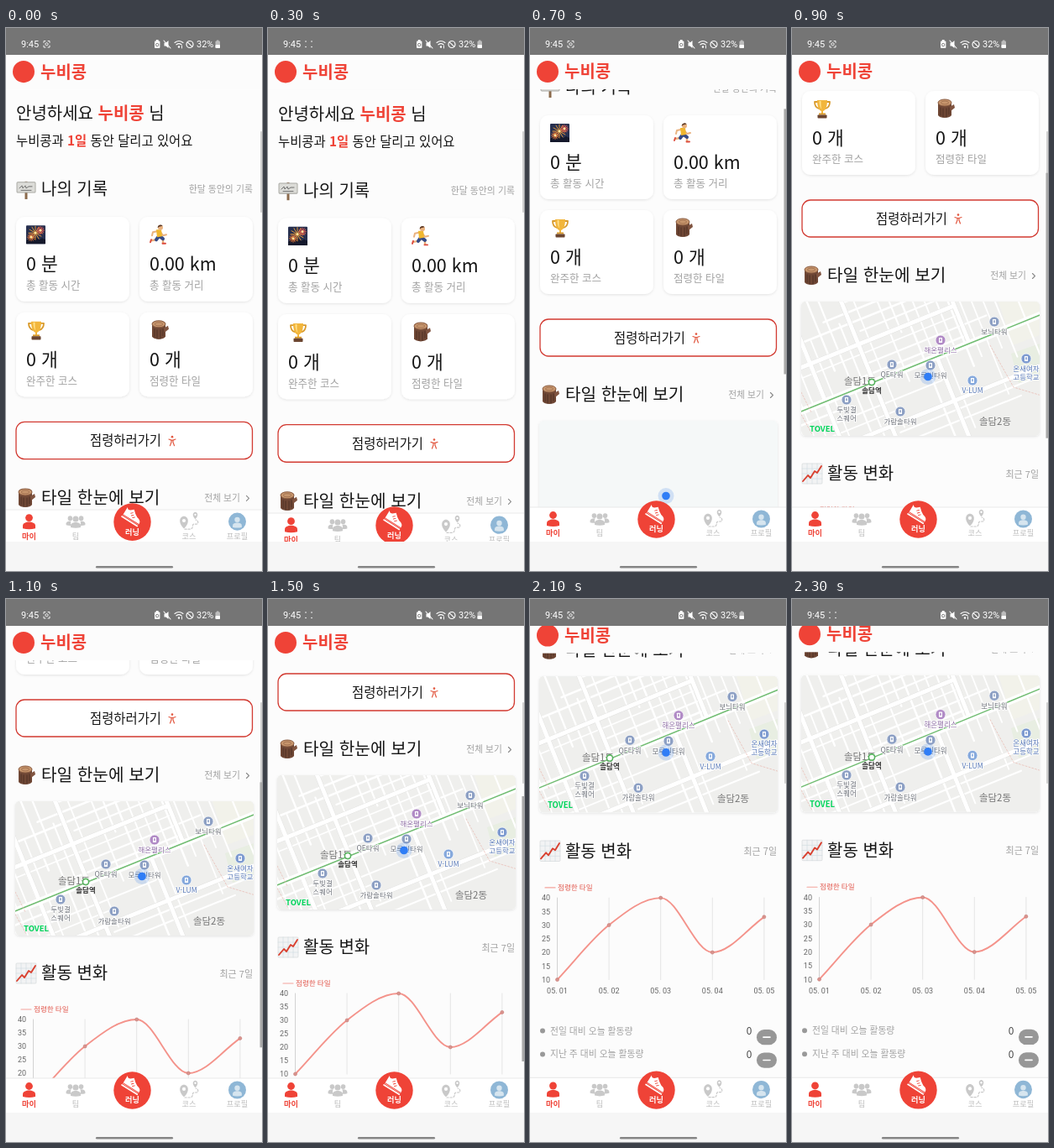
Animation, 305 px wide and 647 px high, one loop 2400 ms. Source, as an HTML page:

```html
<!DOCTYPE html>
<html lang="ko">
<head>
<meta charset="utf-8">
<style>
html, body { margin: 0; width: 100%; height: 100%; overflow: hidden; background: #f6f6f6; }
svg { display: block; width: 305px; height: 647px; }
text { font-family: "Noto Sans CJK KR", "Noto Sans CJK", "Noto Sans", sans-serif; white-space: pre; }
.ui text { font-family: Roboto, "Noto Sans", sans-serif; }
</style>
</head>
<body>
<svg id="stage" viewBox="0 0 305 647"></svg>
<script>
const RED = '#ef4337', GRAY = '#a2a2a2', INK = '#161616', PAPER = '#fcfcfc';
const $ = id => document.getElementById(id);

// Shape helpers; text is placed by its vertical middle.
const text = (x, y, size, str, fill = INK, extra = '') =>
  `<text x="${x}" y="${y + size * .37}" font-size="${size}" fill="${fill}" ${extra}>${str}</text>`;
const rect = (x, y, w, h, fill, r = 0, extra = '') =>
  `<rect x="${x}" y="${y}" width="${w}" height="${h}" rx="${r}" fill="${fill}" ${extra}/>`;
const dot = (x, y, r, fill, extra = '') => `<circle cx="${x}" cy="${y}" r="${r}" fill="${fill}" ${extra}/>`;
const path = (d, fill) => `<path d="${d}" fill="${fill}"/>`;
const line = (d, color, w = 1, extra = '') =>
  `<path d="${d}" fill="none" stroke="${color}" stroke-width="${w}" stroke-linecap="round" stroke-linejoin="round" ${extra}/>`;
const at = (x, y, body, more = '') => `<g transform="translate(${x} ${y}) ${more}">${body}</g>`;
const MID = 'text-anchor="middle"', END = 'text-anchor="end"', MED = 'font-weight="500"', BOLD = 'font-weight="700"';

let seed = 11;
const random = () => (seed = seed * 16807 % 2147483647) / 2147483647;

// Pictograms on a 24 px square
const sign = rect(10.5, 3, 3, 21, '#8b6a4c') + rect(1, 4, 22, 12, '#dcdcd8', 1, 'stroke="#a9a9a4"') +
  line('M4 11l3-3 1 3 3-3 1 3 3-2 4 0M6 13.5h12', '#555', .8);

function fireworks() {
  let s = rect(0, 1, 23, 22, '#27304f', 1) + path('M0 19l4-3 3 2 4-3 5 3 3-2 4 2v5H0z', '#15192c');
  [[11, 10, 8, '#f2a13a'], [17, 7, 4.5, '#ee5d50'], [6, 15, 4.5, '#ef7b3a']].forEach(([x, y, r, c]) => {
    for (let i = 0; i < 12; i++) {
      const a = i * Math.PI / 6, u = Math.cos(a), v = Math.sin(a);
      s += line(`M${x + u * 1.5} ${y + v * 1.5}L${x + u * r} ${y + v * r}`, c, .9);
    }
    s += dot(x, y, 1.4, '#ffe9a0');
  });
  return s;
}

const runner = line('M11 15l-3 3-6 1', '#e9b27f', 2.4) + line('M12 15l4 3 0 4', '#e9b27f', 2.4) +
  line('M9 8l-5 1-1 4M13 9l3 4 4-1', '#e9b27f', 2) + line('M11 14l-3 4M12 14l4 3', '#364b86', 4) +
  path('M8 6h6l1 8-6 1z', '#f0b72f') + dot(13, 3.6, 3, '#e9b27f') + path('M9.6 4a3.4 3.4 0 0 1 6-2.4l-4 1z', '#5b3825') +
  line('M2 18l-1 3M15.5 22.5h3.5', '#dc4a3c', 1.9);

const trophy = line('M7 4H3c0 5 2 7 5 8M17 4h4c0 5-2 7-5 8', '#d99a2b', 1.8) +
  path('M6 2h12c0 8-2 12-5 13v3h-2v-3C8 14 6 10 6 2z', '#f2b63c') + path('M8.5 3h2c0 5 0 7 1 10-2-2-3-5-3-10z', '#ffe08a') +
  rect(8, 17.5, 8, 2, '#d99a2b') + rect(6.5, 19.5, 11, 4, '#6b4530', .7);

const log = path('M3 5v15c2 4 14 4 16 0V5z', '#6f4735') + path('M17 10l5-3 1 4-5 4z', '#805440') +
  line('M6 11v9M9 12v10M13 12v10M16 11v8', '#4e3025', 1) + `<ellipse cx="11" cy="5" rx="8" ry="4" fill="#c7966d" stroke="#8a5c42"/>` +
  `<ellipse cx="11" cy="5" rx="4.5" ry="2" fill="none" stroke="#9b6a4b" stroke-width=".8"/>`;

const trend = rect(0, 0, 24, 24, '#f2f3f4', 1, 'stroke="#d4d8da" stroke-width=".7"') +
  line('M0 6h24M0 12h24M0 18h24M6 0v24M12 0v24M18 0v24', '#cfdbe0', .6) +
  line('M1 21l6-7 3 3 5-8 3 2 5-8', '#d9402f', 1.9);

function card(x, y, icon, value, label) {
  return rect(x, y, 135, 100, '#fff', 10, 'filter="url(#soft)"') + at(x + 12, y + 9, icon) +
    text(x + 12, y + 56, 21.5, value, INK, MED) + text(x + 12, y + 81, 12.5, label, GRAY);
}

function cityMap() {
  let roads = '';
  for (let v = -125; v < 280; v += 13) {
    const a = -40 + random() * 130, b = a + 70 + random() * 150, h = v - 20;
    roads += line(`M${a} ${h}H${b}`, '#fff', 1.6 + random()) + line(`M${v} ${a - 90}V${b - 70}`, '#fff', 1.5 + random());
  }
  const avenue = 'M-60 73.5H350M82 -120V270M205 -90V73M163 73V260M-60 25H205M40 130H340M20 -90V200';
  const grid = `<g transform="rotate(-22 142 73.5)">${roads}${line(avenue, '#e2e2e0', 6)}${line(avenue, '#fff', 5)}` +
    line('M-60 73.5H350', '#fff', 8) + line('M-60 73.5H350', '#72bd73', 1.5) + '</g>' +
    line('M-2 131L13 158M0 108l12 24M225 52l28 50 40 12', '#e9b8b0', .7, 'stroke-dasharray="2 2"');
  const poi = (x, y, str, color, ink = '#6c7078') => dot(x, y, 6, color, 'stroke="#fff" stroke-width=".7"') +
    rect(x - 2, y - 3, 4, 6, '#fff', .6) + rect(x - .8, y - 1.8, 1.6, 3, color) +
    str.split('|').map((s, i) => text(x, y + 12 + i * 9.8, 8.5, s, ink,
      MID + ' stroke="#fff" stroke-width="1.6" paint-order="stroke"')).join('');
  const blue = '#8da0c4';
  return rect(0, 0, 284, 160, '#efefed') + path('M235 0h49v40l-32 12z', '#f2f2ea') + path('M250 62l34-12v42l-25 5z', '#e8eee2') + grid +
    poi(166, 46, '해온팰리스', '#b18bc6', '#8f6ea5') + poi(108, 75, 'QE타워', blue) + poi(154, 76, '모루빈타워', blue) +
    poi(230, 24, '보늬타워', blue) + poi(268, 68, '온새여자|고등학교', '#7e9bd0', '#5576b5') +
    poi(204, 94, 'V-LUM', '#86a9dc', '#5576b5') + poi(54, 117, '두빛결|스퀘어', blue) + poi(118, 131, '가람솔타워', blue) +
    text(70, 95, 11.5, '솔담1동', '#777', MID) + text(231, 143, 11.5, '솔담2동', '#777', MID) +
    dot(84, 96, 3.6, '#fff', 'stroke="#55b35c" stroke-width="1.6"') + text(84, 106, 8.5, '솔담역', '#333', MID + BOLD) +
    text(10, 151, 9.5, 'TOVEL', '#03d45c', 'font-weight="900"');
}

function chart() {
  const px = i => 32.5 + i * 61.6, py = v => 976 - v * 3.2, values = [10, 30, 40, 20, 33];
  let s = line('M18 836h12', '#f3a29b', 1.2) + text(33, 836, 8.6, '점령한 타일', '#e2574c');
  for (let v = 10; v <= 40; v += 5) s += text(24, py(v), 9, v, '#666', END);
  values.forEach((v, i) => s += line(`M${px(i)} 848V944`, i ? '#e3e3e3' : '#cfcfcf', .9) +
    text(px(i), 957, 9, '05. 0' + (i + 1), '#666', MID));
  s += line('M32.5 944C53 922.7 73.5 896 94 880S135 848 155.7 848S196.5 912 217.3 912S258.5 884.5 279 870.4', '#f4938b', 1.9);
  values.forEach((v, i) => s += dot(px(i), py(v), 2, '#d9948e', 'stroke="#c77b76" stroke-width=".6"'));
  return `<g class="ui">${s}</g>`;
}

const stat = (y, label) => dot(15, y, 3, '#999') + text(24, y, 10.8, label, GRAY) + text(261, y, 12, '0', '#444', MID);
const pill = y => rect(270, y - 9, 24, 18, '#979797', 9) + line(`M278 ${y}h8`, '#fff', 1.6);

const content =
  text(12, 101.5, 20, `안녕하세요 <tspan fill="${RED}" font-weight="700">누비콩</tspan> 님`, INK, MED) +
  text(12, 133.5, 15.4, `누비콩과 <tspan fill="${RED}" font-weight="700">1일</tspan> 동안 달리고 있어요`, INK, MED) +
  at(12, 179, sign) + text(42, 191, 20, '나의 기록', INK, MED) + text(294, 191.5, 10.9, '한달 동안의 기록', GRAY, END) +
  card(12, 224, fireworks(), '0 분', '총 활동 시간') + card(159, 224, runner, '0.00 km', '총 활동 거리') +
  card(12, 337, trophy, '0 개', '완주한 코스') + card(159, 337, log, '0 개', '점령한 타일') +
  rect(12, 467, 281.5, 44, '#fff', 10, 'stroke="#d23a31" stroke-width="1.3"') + text(100, 489, 15.4, '점령하러가기', INK, MED) +
  dot(198, 484.6, 1.3, '#e2573f') + line('M194 487.5l3 1h2l3-1M197 488.5v2.5l-1.5 4M199 488.5v2.5l1.5 4', '#e2573f', 1.2) +
  at(12, 545, log) + text(42, 557, 20.2, '타일 한눈에 보기', INK, MED) + text(279, 557.5, 10.8, '전체 보기', GRAY, END) +
  line('M286.5 554.5l3 3-3 3', '#888', 1.1) +
  rect(11, 588, 284, 160, '#f5f8f8', 5, 'filter="url(#soft)"') +
  at(11, 588, `<g id="city" clip-path="url(#mapClip)">${cityMap()}</g>` +
    dot(151, 89.5, 9.5, '#4f8fe8', 'opacity=".22"') + dot(151, 89.5, 4.8, '#2f7df6')) +
  at(12, 781, trend) + text(42, 793, 20, '활동 변화', INK, MED) + text(294, 793.5, 11, '최근 7일', GRAY, END) + chart() +
  stat(1004, '전일 대비 오늘 활동량') + stat(1031.5, '지난 주 대비 오늘 활동량') +
  `<g id="pills">${pill(1005.5)}${pill(1032.5)}</g>`;

const header = rect(0, 20, 305, 53, PAPER) + dot(21, 52, 13, RED) + text(41, 52, 20, '누비콩', RED, 'font-weight="900"');

const person = (x, y, k, color) => at(x, y, dot(0, -4.5, 4.4, color) + path('M-7.5 8V5c0-6 15-6 15 0v3q-7.5 2-15 0z', color), `scale(${k})`);
const pin = (x, y, k) => at(x, y, path('M0 7C-8-1-4-7 0-7S8-1 0 7z', '#c9c9c9') + dot(0, -2, 2, '#fff'), `scale(${k})`);
const shoe = path('M-11-6q2 3 5 1l3-3q4 4 8 6q6 1 6 5v2H-11z', '#fff') + line('M-11 6.8H10.5', '#fff', 1.7) +
  line('M-2-4l-2 2M0-2l-2 2M2.5-.5l-2 2M-11 4.2H11', RED, .9);
const tab = (x, label, color = '#bdbdbd', extra = '') => text(x, 602, 9.2, label, color, MID + extra);
const nav = rect(0, 571, 305, 60, '#fff') + line('M0 571H305', '#e4e4e4', .8) +
  person(27.5, 585, 1, RED) + tab(27.5, '마이', RED, BOLD) +
  person(76.5, 584, .65, '#c9c9c9') + person(89.5, 584, .65, '#c9c9c9') + at(83, 585, '', '') +
  dot(83, 579, 4.3, '#fff') + rect(77, 583, 12, 12, '#fff', 4) + person(83, 585.5, .8, '#c9c9c9') + tab(83, '팀') +
  dot(150.5, 585.5, 22.2, RED) + at(151, 579, shoe, 'rotate(32)') + text(150.5, 597, 9.2, '러닝', '#fff', MID + BOLD) +
  pin(212, 586, 1.05) + pin(225.5, 578, .6) +
  line('M213 594h6c5 0 2-6 5-6h3c3 0 2-5-1-5', '#c9c9c9', 1.2, 'stroke-dasharray="2.2 1.8"') + tab(218, '코스') +
  dot(275.5, 585, 10.5, '#8fb7d6') + person(275.5, 586, .72, '#d6e5ef') + tab(275.5, '프로필');

const status = `<g class="ui">${rect(0, 0, 305, 32, '#757575')}` + text(18, 19.2, 11, '9:45', '#fff') +
  `<g id="face">${line('M45 17.5v-2h2M50 15.5h2v2M52 21v2h-2M47 23h-2v-2', '#fff', .9)}${dot(48.5, 19.2, 1.6, 'none', 'stroke="#fff" stroke-width=".9"')}</g>` +
  `<g id="corners">${[45, 52].map(x => dot(x, 16, .8, '#fff') + dot(x, 22.5, .8, '#fff')).join('')}</g>` +
  rect(177, 15.5, 6.4, 8.5, '#fff', 1) + rect(178.8, 14, 2.8, 2, '#fff') + dot(180.2, 20, 1.7, 'none', 'stroke="#757575" stroke-width=".9"') +
  path('M188.5 17.5h2l3-2.5v9l-3-2.5h-2z', '#fff') + line('M188 15l8 9', '#fff', 1.1) +
  line('M201 17.5q5-4 10 0M203 19.8q3-2.4 6 0', '#fff', 1.1) + dot(206, 22.5, 1.2, '#fff') + line('M209.5 21v3', '#fff', .9) +
  dot(219, 19.5, 4, 'none', 'stroke="#fff" stroke-width="1.2"') + line('M216.3 16.8l5.4 5.4', '#fff', 1.1) +
  text(227, 19.2, 11, '32%', '#fff') + rect(249.5, 15.5, 5.5, 8.5, '#bdbdbd', 1) + rect(249.5, 20, 5.5, 4, '#fff', 1) + rect(251, 14.5, 2.5, 1.5, '#bdbdbd') + '</g>';

$('stage').innerHTML = `<defs>
  <clipPath id="view"><rect y="32" width="305" height="580"/></clipPath>
  <clipPath id="mapClip"><rect width="284" height="160" rx="5"/></clipPath>
  <filter id="soft" x="-10%" y="-10%" width="120%" height="125%"><feDropShadow dx="0" dy="1" stdDeviation="1.6" flood-opacity=".1"/></filter>
  </defs>` + rect(0, 0, 305, 647, '#f6f6f6') +
  `<g clip-path="url(#view)">${rect(0, 32, 305, 580, PAPER)}<g id="page"><g id="scroll">${content}</g>${header}${nav}</g></g>` +
  status + rect(303, 123, 2, 97, '#d2d2d2', 1) + rect(302.5, 32, 2.5, 316, '#a9a9a9', 0, 'id="bar"') +
  rect(107, 641, 92, 2.6, '#858585', 1.3);

// Keys are [ms, value], joined by straight lines.
const scrollKeys = [[400, 0], [500, 12], [600, 55], [700, 120], [800, 195], [900, 262], [1000, 314], [1100, 347],
  [1200, 366], [1300, 375], [1400, 378], [1500, 378], [1600, 428], [1700, 488]];
const topPull = [[0, .0056], [200, .012], [300, .013], [500, 0]];
const bottomPull = [[1800, 0], [2000, .013], [2200, .018]];

function track(keys, t) {
  const i = keys.findIndex(k => k[0] >= t);
  if (i < 0) return keys[keys.length - 1][1];
  if (i === 0) return keys[0][1];
  const [a, b] = [keys[i - 1], keys[i]];
  return a[1] + (b[1] - a[1]) * (t - a[0]) / (b[0] - a[0]);
}

const show = (id, on) => $(id).setAttribute('display', on ? 'inline' : 'none');
const move = (id, y) => $(id).setAttribute('transform', `translate(0 ${y})`);

function draw(now) {
  const t = Math.floor(now % 2400 / 100) * 100;
  const y = track(scrollKeys, t), low = track(bottomPull, t);
  const k = 1 + track(topPull, t) + low, anchor = low ? 612 : 32;
  $('page').setAttribute('transform', `translate(0 ${anchor * (1 - k)}) scale(1 ${k})`);
  move('scroll', -y);
  move('bar', y * .537);
  move('pills', low ? 6 : 0);
  show('bar', t >= 400 && t < 2000);
  show('city', t >= 900);
  const blink = t % 1000 >= 200 && t % 1000 < 600;
  show('face', !blink);
  show('corners', blink);
}

const start = performance.now();
function loop() {
  draw(performance.now() - start);
  requestAnimationFrame(loop);
}
loop();
</script>
</body>
</html>
```
